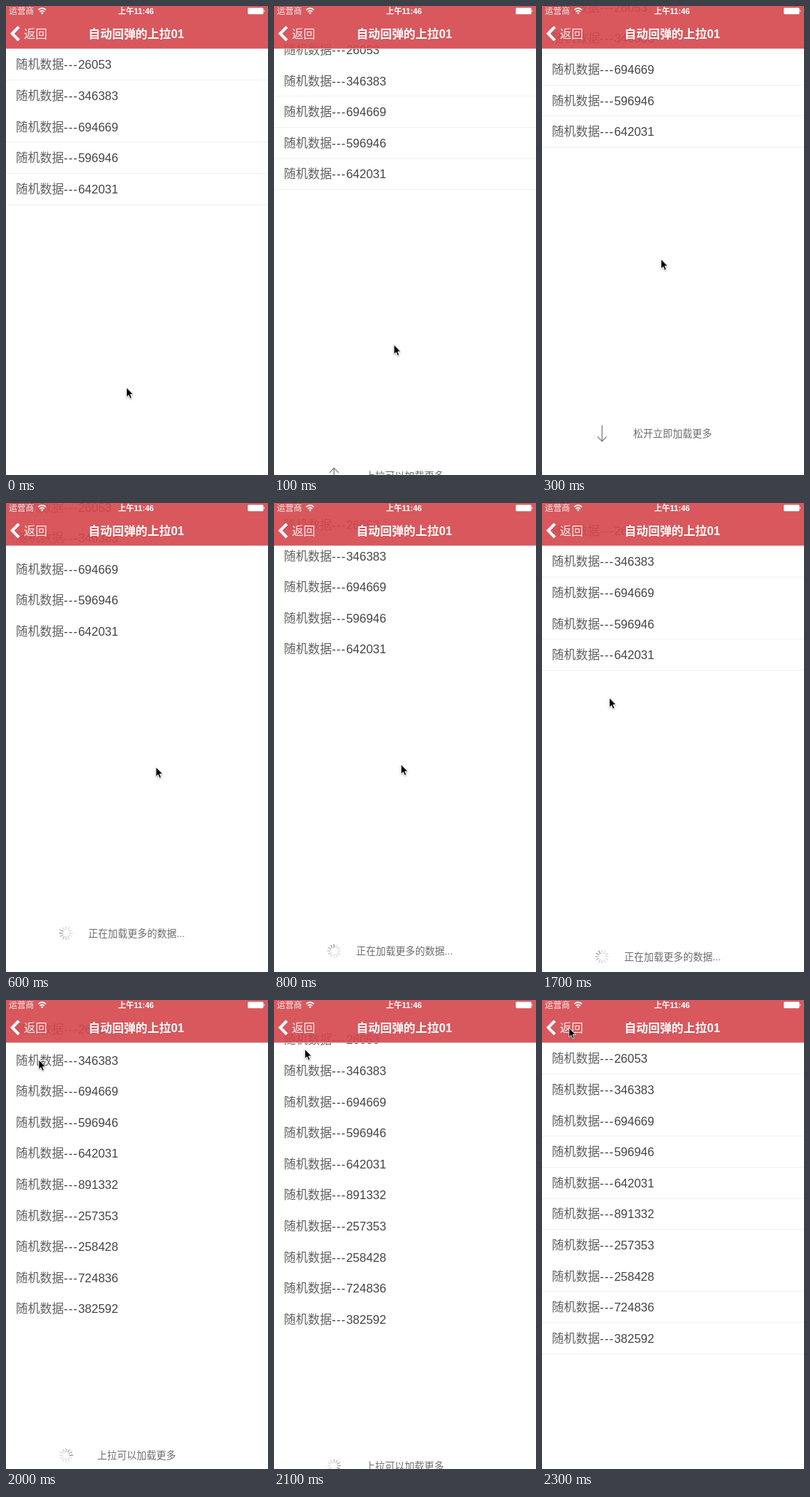
These frames come from a looping animation (360 by 643 pixels, 2.4 s). An HTML page:

```html
<!DOCTYPE html>
<html lang="zh-CN">
<head>
<meta charset="utf-8">
<title>上拉加载</title>
<style>
  html, body { margin: 0; width: 100%; height: 100%; overflow: hidden; background: #fff; }
  svg { display: block; width: 360px; height: 643px; }
  text { font-family: "Liberation Sans", "Noto Sans CJK SC", "Noto Sans CJK", sans-serif; white-space: pre; }
  .row { font-size: 16.5px; font-weight: 300; fill: #606060; }
  .row tspan { fill: #444; }
  .row .dash { letter-spacing: 1.05px; }
  .line { fill: #f0f0f0; }
  .hint { font-size: 13.5px; fill: #6c6c6c; text-anchor: middle; }
  .bar text { fill: #fff; }
  .bar .soft { font-weight: 300; opacity: .9; }
  .bold { font-weight: 700; }
  .stroke { fill: none; stroke: #fff; }
  #cursor { filter: drop-shadow(0 1.2px 1px rgba(0, 0, 0, .3)); }
</style>
</head>
<body>
<svg viewBox="0 0 360 643">
  <g id="list"></g>

  <g id="footer">
    <text class="hint" id="hint" x="179.5" y="5"></text>
    <path id="arrow" d="M82.5 -11V10.5M76.3 4.3L82.5 10.8L88.7 4.3" fill="none" stroke="#777" stroke-width="1.2"/>
    <g id="spinner" transform="translate(82.5 0)"></g>
  </g>

  <g class="bar">
    <rect width="360" height="58" fill="#d5484e" fill-opacity=".91"/>
    <rect y="58" width="360" height="1" fill="#dcb4b6"/>
    <text class="soft" x="4" y="11.3" font-size="11.5">运营商</text>
    <path class="stroke" stroke-width="1.7" d="M44.3 5.3Q49.6 .8 54.9 5.3M46.4 7.8Q49.6 5.2 52.8 7.8"/>
    <path fill="#fff" d="M47.8 9.4Q49.6 8 51.4 9.4L49.6 11.4Z"/>
    <text class="bold" x="154" y="11" font-size="10.9">上午11:46</text>
    <rect x="332.3" y="2.4" width="21.3" height="8.8" rx="1.2" fill="#fff"/>
    <path fill="#fff" d="M354.3 5Q356.3 6.8 354.3 8.6Z"/>
    <path class="stroke" stroke-width="4" d="M17.6 28.6L8.6 37.8L17.6 47"/>
    <text class="soft" x="24.5" y="44" font-size="16">返回</text>
    <text class="bold" x="179" y="43.8" font-size="16.2" text-anchor="middle">自动回弹的上拉01</text>
  </g>

  <path id="cursor" d="M0 0V13.2L3 10.5L5 15.2L7.3 14.2L5.3 9.6H9.4Z" fill="#000" stroke="#fff" stroke-width=".9"/>
</svg>

<script>
const LOOP = 2400, STEP = 100;
const TOP = 59, PITCH = 42.6, FOOTER_Y = 664.5, PULL = 78.5;
const ARMED = 200, RELEASED = 520, HELD = 920, LOADED = 1950, RESTED = 2300;
const values = [26053, 346383, 694669, 596946, 642031, 891332, 257353, 258428, 724836, 382592];

// [time, x, y] of the pointer tip
const pointer = [[0, 165.5, 523], [300, 163.5, 347], [600, 206, 362], [1100, 127.5, 353],
  [1500, 127, 352], [1700, 92.5, 267], [1800, 67, 175], [2000, 45, 82], [2300, 37, 38], [LOOP, 37, 38]];

const $ = id => document.getElementById(id);

function add(parent, tag, attrs, text = "") {
  const el = document.createElementNS("http://www.w3.org/2000/svg", tag);
  for (const key in attrs) el.setAttribute(key, attrs[key]);
  el.textContent = text;
  return parent.appendChild(el);
}

const show = (el, on) => el.setAttribute("visibility", on ? "visible" : "hidden");
const move = (el, x, y) => el.setAttribute("transform", `translate(${x} ${y})`);

function ease(t, from, to) {
  const p = Math.min(1, Math.max(0, (t - from) / (to - from)));
  return p * p * (3 - 2 * p);
}

// pull up, spring back until the footer just shows, then return to rest
const scrollAt = t => -PULL * ease(t, 0, 300)
  + (PULL - PITCH) * ease(t, RELEASED, HELD)
  + PITCH * ease(t, LOADED, RESTED);

function pointerAt(t) {
  const next = pointer.findIndex(key => key[0] > t);
  const [t0, x0, y0] = pointer[next - 1], [t1, x1, y1] = pointer[next];
  const p = (t - t0) / (t1 - t0);
  return [x0 + (x1 - x0) * p, y0 + (y1 - y0) * p];
}

const rows = values.map(value => {
  const label = add($("list"), "text", { class: "row", x: 13.5 }, "随机数据");
  add(label, "tspan", { class: "dash" }, "---");
  add(label, "tspan", {}, value);
  const line = add($("list"), "rect", { class: "line", width: 360, height: 1 });
  return { label, line };
});

const spokes = Array.from({ length: 12 }, (_, i) => add($("spinner"), "line", {
  y1: -5, y2: -9, stroke: "#777", "stroke-width": 1.4, "stroke-linecap": "round",
  transform: `rotate(${i * 30})`
}));

function drawRows(t, offset) {
  const count = t < LOADED ? 5 : 10;
  const gliding = (t > RELEASED && t < HELD) || (t > LOADED && t < RESTED);
  rows.forEach(({ label, line }, i) => {
    const y = TOP + PITCH * i + offset, bottom = y + PITCH;
    // hairlines drop out at some subpixel positions
    const part = bottom - Math.floor(bottom);
    const lost = part > .1 && part < .28;
    label.setAttribute("y", y + 27.3);
    line.setAttribute("y", Math.floor(bottom + .01));
    show(label, i < count);
    show(line, i < count && !gliding && !lost);
  });
}

function drawFooter(t, offset) {
  const loading = t > RELEASED && t < LOADED;
  const armed = t >= ARMED && t < RELEASED;
  move($("footer"), 0, FOOTER_Y + offset);
  $("hint").textContent = loading ? "正在加载更多的数据..."
    : armed ? "松开立即加载更多" : "上拉可以加载更多";
  show($("arrow"), t < RELEASED);
  $("arrow").setAttribute("transform", armed ? "" : "rotate(180 82.5 0)");
  show($("spinner"), t > RELEASED);
  const head = Math.floor((t - 2000) * 12 / 1000) + 3;
  spokes.forEach((spoke, i) => {
    const age = ((head - i) % 12 + 12) % 12;
    spoke.setAttribute("opacity", Math.max(.25, .75 - age * .09));
  });
}

function draw(time) {
  const t = Math.floor(time % LOOP / STEP) * STEP;
  const offset = scrollAt(t);
  drawRows(t, offset);
  drawFooter(t, offset);
  move($("cursor"), ...pointerAt(t));
}

const start = performance.now();
function tick() {
  draw(performance.now() - start);
  requestAnimationFrame(tick);
}
tick();
</script>
</body>
</html>
```
